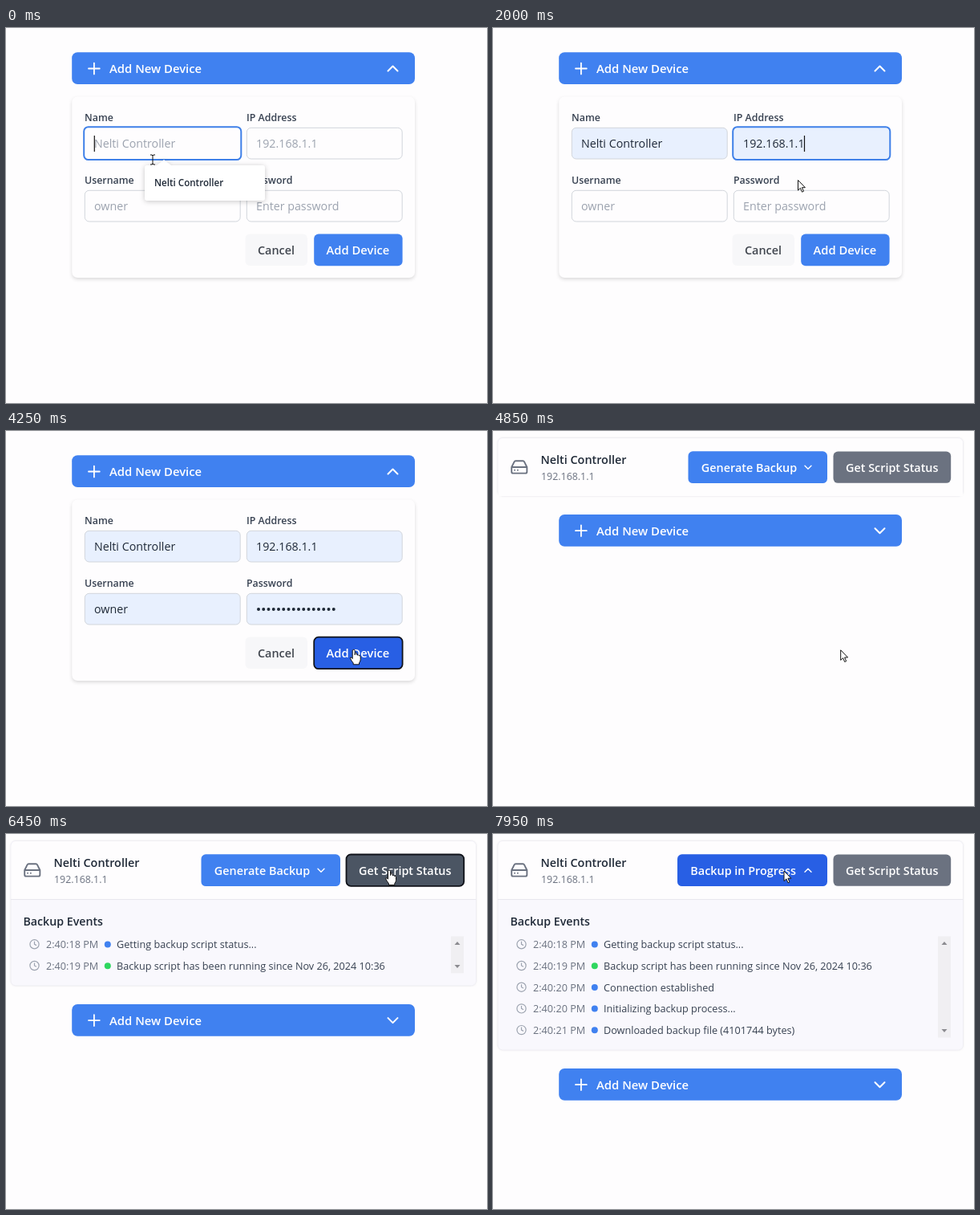
These frames come from a looping animation (600x467 px, 8 s). An HTML page:

```html
<!DOCTYPE html>
<html lang="en">
<head>
<meta charset="utf-8">
<title>Add a device</title>
<style>
html, body { margin: 0; width: 100%; height: 100%; overflow: hidden; background: #fefdfe; }
svg { display: block; width: 100vw; height: 100vh; }
text { font: 400 14.25px "Open Sans", "Noto Sans", sans-serif; fill: #1f2937; white-space: pre; }
.b { font-weight: 600; font-size: 14.4px; }
.label { font-weight: 600; font-size: 12.4px; fill: #374151; }
.small { font-size: 12.66px; }
.mute { fill: #6b7280; }
.hint { fill: #9ca3af; }
.inv { fill: #fff; }
.line { fill: none; stroke-width: 2; stroke-linecap: round; stroke-linejoin: round; }
.dots { fill: none; stroke: #1f2937; stroke-linecap: round; }
.field { fill: #fefdfe; stroke: #d1d5db; }
.field.full { fill: #e8f0fe; }
.field.focus { stroke: #3f80e8; stroke-width: 2; }
.blue { fill: #4081f0; }
.blue.hot { fill: #285fe4; }
.gray { fill: #6b7280; }
.gray.hot { fill: #4b5563; }
.ring { stroke: #10131a; stroke-width: 1.8; }
.pop { fill: #fff; filter: drop-shadow(0 1px 3px rgba(0, 0, 0, .22)); }
.sheet { filter: drop-shadow(0 2px 2px rgba(0, 0, 0, .14)); }
.card { filter: drop-shadow(0 .5px 1px rgba(0, 0, 0, .06)); }
.arrow { fill: #fff; stroke: #111; stroke-width: 1; stroke-linejoin: round; }
</style>
</head>
<body>
<svg viewBox="0 0 600 467" preserveAspectRatio="none">
  <g id="form">
    <rect class="sheet" x="82.3" y="85.5" width="427.7" height="225.5" rx="7" fill="#fefdfe"/>
    <g id="fields"></g>
    <rect x="298.5" y="256.5" width="77.5" height="39.5" rx="5.7" fill="#f7f7f9"/>
    <text class="b" x="314" y="282" style="fill:#41464f">Cancel</text>
    <rect id="send" class="blue" x="384.2" y="256.6" width="110.4" height="39.6" rx="5.7"/>
    <text class="b inv" x="399.5" y="282.2" style="font-size:14.75px">Add Device</text>
    <g id="pops"></g>
    <g id="login">
      <rect class="pop" x="177" y="250" width="193" height="99" rx="4"/>
      <rect id="loginRow" x="181" y="254" width="185" height="48" rx="3" fill="#ececee"/>
      <circle cx="196" cy="279" r="6.5" fill="#6a6cf0"/>
      <text class="b" x="214" y="273" style="font-size:11.4px">owner</text>
      <path class="dots" d="M216 290H290" stroke-width="3" stroke-dasharray="0 4.9"/>
      <path d="M177 307.5H370" stroke="#e3e3e6"/>
      <circle cx="198" cy="327" r="6" fill="#e8502f"/>
      <text x="218" y="331" style="font-size:11.7px">Manage passwords...</text>
      <path d="M348 327H356V330M353 327V329.5" fill="none" stroke="#4b4b50" stroke-width="2"/>
      <circle cx="345" cy="327" r="3.5" fill="none" stroke="#4b4b50" stroke-width="2.4"/>
    </g>
    <path id="caret" stroke="#111" stroke-width="1.2"/>
  </g>

  <g id="list">
    <rect id="card" class="card" x="6" y="8.5" width="580.5" rx="6" fill="#f9f8fd" stroke="#efeef3"/>
    <path d="M6.5 81V15a6 6 0 0 1 6-6H580a6 6 0 0 1 6 6V81Z" fill="#fefdfe"/>
    <g transform="translate(21.3 33.5) scale(.957)" class="line" stroke="#6b7280">
      <path d="M22 12H2M5.45 5.11 2 12v6a2 2 0 0 0 2 2h16a2 2 0 0 0 2-2v-6l-3.45-6.89A2 2 0 0 0 16.76 4H7.24a2 2 0 0 0-1.79 1.11zM6 16h.01M10 16h.01"/>
    </g>
    <text class="b" x="59.5" y="41">Nelti Controller</text>
    <text class="mute" x="60" y="61.2" style="font-size:12.4px">192.168.1.1</text>
    <rect id="backup" class="blue" y="25.3" height="39.8" rx="5.7"/>
    <text id="backupText" class="b inv" y="51"></text>
    <path id="backupChev" class="line" stroke="#fff" style="stroke-width:1.4px"/>
    <rect id="status" class="gray" x="424.5" y="25.5" width="146.7" height="39.3" rx="5.7"/>
    <text class="b inv" x="440" y="51">Get Script Status</text>
    <g id="events">
      <path d="M6 81.5H586.5" stroke="#e9e8ee"/>
      <text class="b" x="21.5" y="114.3" style="font-size:14.2px">Backup Events</text>
      <g id="rows"></g>
      <rect id="bar" x="555" y="127.5" width="16" fill="#f0eff2"/>
      <path id="barTips" fill="#8b8b90"/>
    </g>
  </g>

  <g id="add">
    <rect class="blue" x="82.2" y="30.3" width="427.8" height="39.8" rx="7"/>
    <path class="line" stroke="#fff" style="stroke-width:1.8px" d="M103 50.5H116.8M109.9 43.6V57.4"/>
    <text class="b inv" x="129" y="56.2" style="font-size:14.85px">Add New Device</text>
    <path id="addChev" class="line" stroke="#fff"/>
  </g>

  <g id="mouse">
    <path id="point" class="arrow" d="M0 0V12.6L2.9 9.9 5 14.7 7 13.8 4.9 9.2H8.9Z"/>
    <path id="hand" class="arrow" d="M-1.5 1Q-1.5-.5 0-.5T1.5 1V6Q3-.2 4.3 6.3 5.8 5 6.6 7 8.3 6 8.5 8.2V12Q8.3 14.5 6.8 16V18H-.5V16.2Q-2.8 13.5-4.2 10.5-4.5 8.5-2.8 9.3L-1.5 10.7Z"/>
    <path id="beam" d="M-3-6H-1L0-5 1-6H3M0-5V5M-3 6H-1L0 5 1 6H3" fill="none" stroke="#111"/>
  </g>
</svg>
<script>
const LOOP = 8000, SWAP = 4500;
const $ = id => document.getElementById(id);
const set = (el, a) => { for (const k in a) el.setAttribute(k, a[k]); };
const show = (el, on) => { el.style.display = on ? "" : "none"; };
const inside = ([x, y], [l, t, w, h]) => x >= l && x <= l + w && y >= t && y <= t + h;

// from/to: focus time span, fill: time the value appears, end: caret place
const fields = [
  { x: 98, y: 124, label: "Name", hint: "Nelti Controller", value: "Nelti Controller", from: -50, to: 1200, fill: 350, end: 213 },
  { x: 300, y: 124, label: "IP Address", hint: "192.168.1.1", value: "192.168.1.1", from: 1200, to: 2450, fill: 1450, end: 388.5 },
  { x: 98, y: 202, label: "Username", hint: "owner", value: "owner", from: 2450, to: 4200, fill: 2700, end: 152.5 },
  { x: 300, y: 202, label: "Password", hint: "Enter password", value: "", from: -1, to: -1, fill: 2700 }
];
const pops = [
  { x: 173, text: "Nelti Controller", from: -50, to: 600, hover: 300 },
  { x: 375, text: "192.168.1.1", from: 1200, to: 1700, hover: 1420 }
];
const login = { from: 2450, to: 3100, hover: 2680, box: [177, 250, 193, 99] };
const events = [
  [5450, "2:40:18 PM", "Getting backup script status..."],
  [5850, "2:40:19 PM", "Backup script has been running since Nov 26, 2024 10:36"],
  [7450, "2:40:20 PM", "Connection established"],
  [7550, "2:40:20 PM", "Initializing backup process..."],
  [7650, "2:40:21 PM", "Downloaded backup file (4101744 bytes)"]
];
// [start, end, x, y]: each move ends at x, y
const moves = [
  [0, 0, 183, 164], [50, 400, 205, 190], [800, 1150, 381, 150], [1300, 1550, 380.5, 189.5],
  [2050, 2400, 282, 225], [2550, 2850, 281.5, 262.5], [3450, 4000, 433.7, 272.8],
  [5150, 5380, 478, 45.5], [6500, 7100, 363, 46]
];

$("fields").innerHTML = fields.map(f => {
  const at = `x="${f.x + 12}" y="${f.y + 25.3}"`;
  const value = f.value ? `<text ${at}>${f.value}</text>`
    : `<path class="dots" d="M315 222H410" stroke-width="4" stroke-dasharray="0 6.25"/>`;
  return `<g><text class="label" x="${f.x}" y="${f.y - 8.2}">${f.label}</text>
    <rect class="field" rx="5.5"/><text class="hint" ${at}>${f.hint}</text>${value}</g>`;
}).join("");
$("pops").innerHTML = pops.map(p => `<g>
  <path class="pop" d="M${p.x + 3} 171H${p.x + 15}L${p.x + 24} 164 ${p.x + 33} 171H${p.x + 147}q3 0 3 3V212q0 3-3 3H${p.x + 3}q-3 0-3-3V174q0-3 3-3Z"/>
  <rect x="${p.x}" y="178" width="150" height="29" fill="#ececee"/>
  <text class="b" x="${p.x + 12}" y="196.7" style="font-size:11.6px">${p.text}</text></g>`).join("");
$("rows").innerHTML = events.map(([, time, text], i) => `<g transform="translate(0 ${i * 26.7})">
  <g fill="none" stroke="#9ca3af" stroke-width="1.2"><circle cx="35.5" cy="137.3" r="5.6"/><path d="M35.5 133.8V137.3L38 138.6"/></g>
  <text class="small mute" x="50" y="142.3">${time}</text>
  <circle cx="126.8" cy="137.5" r="4" fill="${i == 1 ? "#2fd75f" : "#4081f0"}"/>
  <text class="small" x="138" y="142.3" style="fill:#374151">${text}</text></g>`).join("");
fields.forEach((f, i) => f.el = $("fields").children[i]);
pops.forEach((p, i) => { p.el = $("pops").children[i]; p.box = [p.x, 171, 150, 44]; });
login.el = $("login");

const ease = p => p * p * (3 - 2 * p);
function mouseAt(t) {
  let [, , x, y] = moves[0];
  for (const [a, b, u, v] of moves) {
    if (t < a || b == a) continue;
    const p = ease(Math.min(1, (t - a) / (b - a)));
    x += (u - x) * p;
    y += (v - y) * p;
  }
  return [x, y];
}
const chevron = (x, y, w, up) => {
  const h = up ? -w / 2 : w / 2;
  return `M${x - w} ${y - h}L${x} ${y + h}L${x + w} ${y - h}`;
};

function drawForm(t, m) {
  let kind = "point";
  for (const f of fields) {
    const [, box, hint, value] = f.el.children;
    const focus = t >= f.from && t < f.to, full = t >= f.fill, d = focus ? .8 : -.3;
    set(box, { x: f.x - d, y: f.y - d, width: 194.5 + 2 * d, height: 39.3 + 2 * d });
    box.classList.toggle("full", full);
    box.classList.toggle("focus", focus);
    show(hint, !full);
    show(value, full);
    if (inside(m, [f.x - 1, f.y - 1, 196, 41.5])) kind = "beam";
  }
  const popups = [...pops, login];
  for (const p of popups) {
    const on = t >= p.from && t < p.to + 190;
    show(p.el, on);
    p.el.style.opacity = Math.min(1, 1 - (t - p.to) / 190);
    const row = p == login ? $("loginRow") : p.el.children[1];
    show(row, t >= p.hover);
    if (on && inside(m, p.box)) kind = "point";
  }
  const f = fields.find(f => t >= f.from && t < f.to);
  if (f) {
    // the blink restarts on focus, fill and choice
    const chosen = popups.map(p => p.to);
    const since = Math.max(...[f.from, f.fill, ...chosen].filter(s => s <= t));
    set($("caret"), { d: `M${t >= f.fill ? f.end : f.x + 12.3} ${f.y + 10}V${f.y + 30}` });
    show($("caret"), Math.floor((t - since) / 530) % 2 == 0);
  } else show($("caret"), false);
  const hot = inside(m, [384, 256.5, 111, 40]);
  $("send").classList.toggle("hot", hot);
  $("send").classList.toggle("ring", t >= 4200);
  if (hot || (t > 3400 && inside(m, [298.5, 256.5, 77.5, 39.5]))) kind = "hand";
  return kind;
}

function drawList(t, m) {
  const n = events.filter(e => t >= e[0]).length;
  const bottom = n ? 135.5 + 26.7 * n : 81;
  const busy = t >= 7450, left = busy ? 230 : 243.5;
  set($("card"), { height: bottom - 8.5 });
  show($("events"), n);
  [...$("rows").children].forEach((row, i) => show(row, i < n));
  if (n) {
    const h = 26.7 * n - 7.5, gap = Math.min(8.5, h * .28), y1 = 127.5 + gap, y2 = 127.5 + h - gap;
    set($("bar"), { height: h });
    set($("barTips"), { d: `M559.5 ${y1 + 2}H566.5L563 ${y1 - 2}ZM559.5 ${y2 - 2}H566.5L563 ${y2 + 2}Z` });
  }
  const overB = inside(m, [left, 25.5, 417 - left, 39.5]), overS = inside(m, [424.5, 25.5, 147, 39.5]);
  set($("backup"), { x: left, width: 417 - left });
  $("backup").classList.toggle("hot", overB);
  set($("backupText"), { x: left + 16.3 });
  $("backupText").textContent = busy ? "Backup in Progress" : "Generate Backup";
  set($("backupChev"), { d: chevron(393, 45.2, 4, busy) });
  $("status").classList.toggle("hot", overS);
  $("status").classList.toggle("ring", t >= 5400 && !busy);
  set($("add"), { transform: `translate(0 ${bottom - 7.3})` });
  return overS || (overB && !busy) ? "hand" : "point";
}

function draw(t) {
  const m = mouseAt(t), open = t < SWAP;
  show($("form"), open);
  show($("list"), !open);
  set($("add"), { transform: "translate(0 0)" });
  set($("addChev"), { d: chevron(482.5, 50.5, 6, open) });
  const kind = open ? drawForm(t, m) : drawList(t, m);
  for (const k of ["point", "hand", "beam"]) show($(k), k == kind);
  set($("mouse"), { transform: `translate(${m[0]} ${m[1]})` });
}

const start = performance.now();
function tick() {
  draw((performance.now() - start) % LOOP);
  requestAnimationFrame(tick);
}
tick();
</script>
</body>
</html>
```
